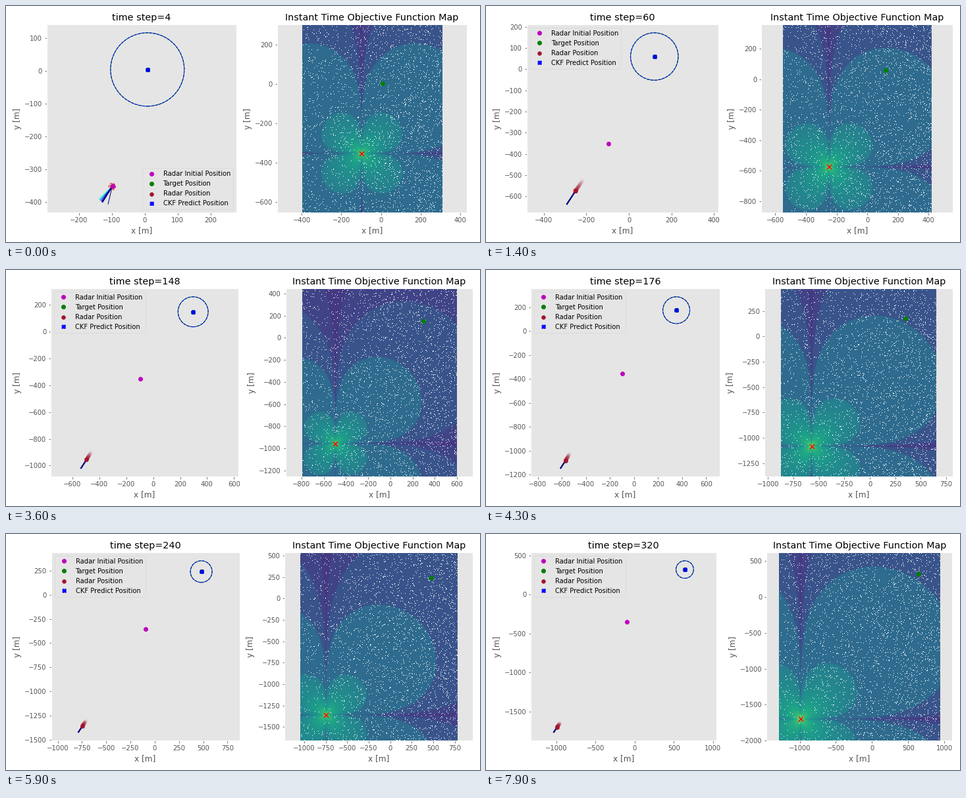
These frames come from a looping animation (720 by 360 pixels, 8 s). A matplotlib script:

```python
import numpy as np
import matplotlib
import matplotlib.pyplot as plt
from matplotlib.animation import FuncAnimation
from matplotlib.patches import Circle

plt.style.use("ggplot")
plt.rcParams["axes.grid"] = False

FRAMES, INTERVAL = 80, 100
START = (-97, -352)
RANGE = 112          # radius of the ring around the tracked object
MARGIN = 300         # map border beyond radar and tracked object
TAIL = 13
CRIMSON = "#a2142f"

# Radar way-points: time step, x, y
WAY = np.array([
    (0, -97, -351), (4, -99, -353), (60, -251, -575), (108, -392, -783),
    (148, -496, -956), (204, -644, -1207), (272, -837, -1496), (320, -990, -1700),
])
FAN = np.array([-14, -10, -7, -3, 2, 20, 0])
FAN_TINT = [.42, .32, .18, .08, .03, 1, 0]
PHASE_STARTS = [7, 43, 73]
PHASE_LEVELS = [6.0, 6.333, 6.833, 7.333]
viridis = matplotlib.colormaps["viridis"]
jet = matplotlib.colormaps["jet"]


def radar_at(step):
    return np.interp(step, WAY[:, 0], WAY[:, 1]), np.interp(step, WAY[:, 0], WAY[:, 2])


def objective_map(i, box, scale, radar):
    """Colours of the four-petal objective, about one cell per screen pixel."""
    x0, x1, y0, y1 = box
    cols, rows = round((x1 - x0) / scale), round((y1 - y0) / scale)
    x = x0 + (np.arange(cols) + .5) * scale - radar[0]
    y = y0 + (np.arange(rows) + .5) * scale - radar[1]
    x, y = np.meshgrid(x, y)
    r = np.hypot(x, y) + 1
    petal = np.abs(2 * x * y) / r**2 + 1e-4
    level = np.log(r) - .3 * np.log(petal)
    level -= PHASE_LEVELS[np.searchsorted(PHASE_STARTS, i, side="right")]

    value = np.select(
        [level < -.5, level < .5, level < 1, level < 1.5],
        [.375 - .1 * level, .35, .26, .205], .165)
    rgb = viridis(value)[..., :3]

    rng = np.random.default_rng(i)
    density = np.linspace(.025, .05, cols)
    rgb[rng.random((rows, cols)) < density * np.clip(level + 2.5, .2, 1)] = 1
    return rgb


def fit(ax, x0, x1, y0, y1):
    """Fill the height and widen x so both axes share one scale."""
    half = (y1 - y0) * ax.bbox.width / ax.bbox.height / 2
    mid = (x0 + x1) / 2
    ax.set(xlim=(mid - half, mid + half), ylim=(y0, y1))


fig, (track, field) = plt.subplots(1, 2, figsize=(10, 5), dpi=72)
for ax in (track, field):
    ax.set_xlabel("x [m]")
    ax.set_ylabel("y [m]")
field.set_title("Instant Time Objective Function Map")

fan = [track.plot([], [], color=jet(t), lw=1)[0] for t in FAN_TINT]
fan[-1].set_linewidth(2.2)
tail = track.scatter([], [], s=36, linewidths=0, zorder=2)
ring = track.add_patch(Circle((0, 0), RANGE, fill=False, ec="g", lw=1))
ring_ckf = track.add_patch(Circle((0, 0), RANGE, fill=False, ec="b", lw=1.1, ls="--"))
near = track.add_patch(Circle((0, 0), 10, fill=False, ec="r", lw=1, ls="--"))
track.plot(*START, "mo", zorder=3, label="Radar Initial Position")
goal, = track.plot([], [], "go", label="Target Position")
radar_dot = track.scatter([0], [0], s=36, color=CRIMSON, zorder=2,
                          label="Radar Position")
ckf, = track.plot([], [], "bX", label="CKF Predict Position")
entries, names = track.get_legend_handles_labels()
order = sorted(range(4), key=lambda k: ["Radar I", "Target ", "Radar P", "CKF Pre"].index(names[k][:7]))
track.legend([entries[k] for k in order], [names[k] for k in order], loc="best")

image = field.imshow(np.ones((2, 2, 3)), origin="lower", aspect="auto",
                     interpolation="nearest")
field_goal, = field.plot([], [], "go")
field_radar, = field.plot([], [], "rx", ms=7, mew=1.5)


def update(i):
    step = 4 + 4 * i
    tx, ty = 2 * step, step
    rx, ry = radar_at(step)
    track.set_title(f"time step={step}")

    spread = .5 ** i
    length = 74 - 19 * spread
    angles = np.radians(237 + FAN * spread)
    ends_x, ends_y = rx + length * np.cos(angles), ry + length * np.sin(angles)
    for line, ex, ey in zip(fan, ends_x, ends_y):
        line.set_data([rx, ex], [ry, ey])

    age = np.arange(TAIL, -1, -1)
    tail.set_offsets(np.column_stack(radar_at(step - age)))
    rgba = np.tile(matplotlib.colors.to_rgba(CRIMSON), (TAIL + 1, 1))
    rgba[:, 3] = .5 * (1 - age / (TAIL + 1)) ** 1.4
    tail.set_facecolor(rgba)

    for circle in (ring, ring_ckf):
        circle.center = tx, ty
    near.center = rx, ry
    for mark in (goal, ckf, field_goal):
        mark.set_data([tx], [ty])
    radar_dot.set_offsets([(rx, ry)])
    field_radar.set_data([rx], [ry])

    low, high = ends_y.min(), ty + RANGE
    pad = .05 * (high - low)
    view = (ends_x.min(), tx + RANGE, low - pad, high + pad)
    box = (rx - MARGIN, tx + MARGIN, ry - MARGIN, ty + MARGIN)

    # The layout follows on from the one before; the first resets it.
    if i == 0:
        fig.subplots_adjust(left=.125, right=.9, bottom=.11, top=.88, wspace=.2)
        field.set(xlim=(box[0], MARGIN), ylim=box[2:])
    else:
        fit(field, *box)
    fit(track, *view)
    fig.tight_layout()

    fit(track, *view)
    fit(field, *box)
    scale = (box[3] - box[2]) / field.bbox.height
    image.set_data(objective_map(i, box, scale, (rx, ry)))
    image.set_extent(box)
    fit(field, *box)


anim = FuncAnimation(fig, update, frames=FRAMES, interval=INTERVAL,
                     init_func=lambda: update(0), repeat=True, repeat_delay=0)
plt.show()
```
